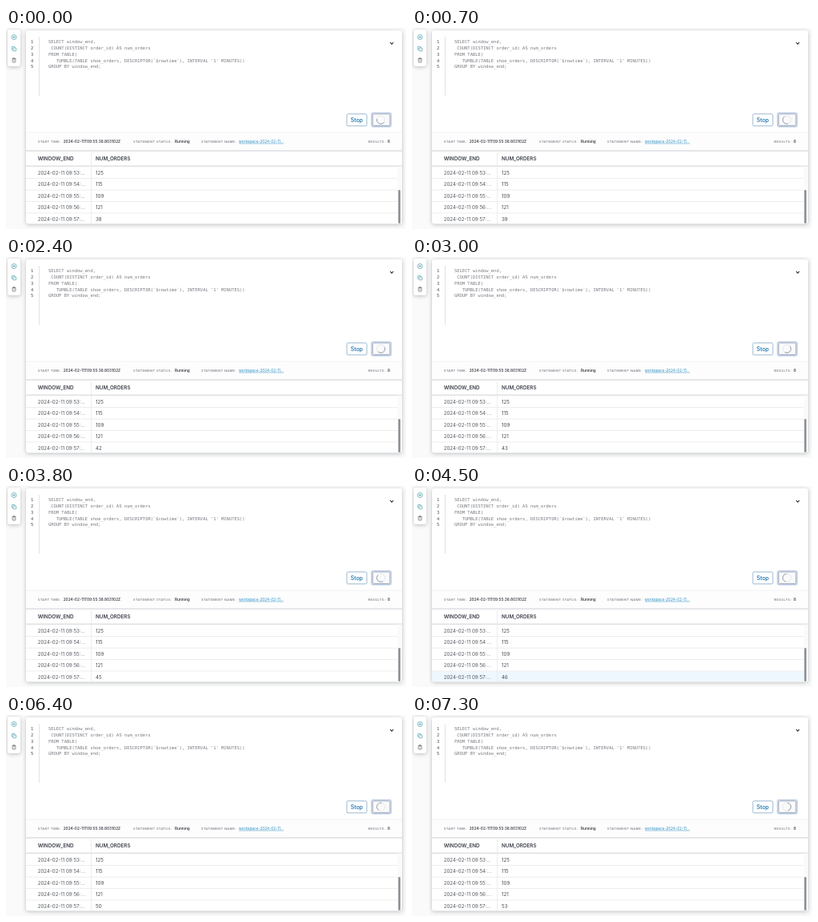
An HTML page with a canvas that plays this animation: 500x252 px, repeating every 7400 ms.

```html
<!DOCTYPE html>
<html lang="en">
<head>
<meta charset="utf-8">
<title>Streaming query results</title>
<style>
  html, body { margin: 0; width: 100%; height: 100%; overflow: hidden; background: #fafafa; }
  canvas { display: block; width: 500px; height: 252px; }
</style>
</head>
<body>
<canvas id="stage"></canvas>
<script>
const W = 500, H = 252, LOOP = 7400, STEP = 100;
const SANS = 'Inter, "Liberation Sans", sans-serif';
const MONO = '"DejaVu Sans Mono", "Liberation Mono", monospace';
const INK = '#3c4048', BLUE = '#2b7db5', TEAL = '#4a9dab', LINE = '#e4e5e8';

// Each update raises the count by one and briefly lights the last row.
const FIRST_COUNT = 38, FLASH = 100;
const UPDATES = [500, 1000, 1600, 2100, 2700, 3100, 3500, 4500,
                 5200, 5600, 5900, 6200, 6600, 6900, 7200];
const SPIN_MS = 625, SPIN_START = 113;

const QUERY = [
  'SELECT window_end,',
  ' COUNT(DISTINCT order_id) AS num_orders',
  'FROM TABLE(',
  "   TUMBLE(TABLE shoe_orders, DESCRIPTOR(`$rowtime`), INTERVAL '1' MINUTES))",
  'GROUP BY window_end;'
];
const COUNTS = [125, 115, 109, 121];

const canvas = document.getElementById('stage');
const ctx = canvas.getContext('2d');
const dpr = window.devicePixelRatio || 1;
canvas.width = W * dpr;
canvas.height = H * dpr;

function text(str, x, y, size, color, { weight = 400, family = SANS, spacing = 0 } = {}) {
  ctx.font = `${weight} ${size}px ${family}`;
  ctx.letterSpacing = spacing + 'px';
  ctx.fillStyle = color;
  ctx.fillText(str, x, y);
  return ctx.measureText(str).width;
}

function rect(x, y, w, h, color) {
  ctx.fillStyle = color;
  ctx.fillRect(x, y, w, h);
}

function box(x, y, w, h, r, fill, stroke, width = 1) {
  ctx.beginPath();
  ctx.roundRect(x, y, w, h, r);
  if (fill) { ctx.fillStyle = fill; ctx.fill(); }
  if (stroke) { ctx.strokeStyle = stroke; ctx.lineWidth = width; ctx.stroke(); }
}

function card(x, y, w, h, r) {
  ctx.save();
  ctx.shadowColor = 'rgba(40, 45, 55, 0.3)';
  ctx.shadowBlur = 5 * dpr;
  ctx.shadowOffsetY = dpr;
  box(x, y, w, h, r, '#fff');
  ctx.restore();
}

function path(points, color, width) {
  ctx.beginPath();
  points.forEach(([x, y], i) => i ? ctx.lineTo(x, y) : ctx.moveTo(x, y));
  ctx.strokeStyle = color;
  ctx.lineWidth = width;
  ctx.stroke();
}

function arc(x, y, r, from, to, color, width) {
  ctx.beginPath();
  ctx.arc(x, y, r, from, to);
  ctx.strokeStyle = color;
  ctx.lineWidth = width;
  ctx.stroke();
}

function drawToolbar() {
  const gray = '#74777d';
  card(2, 2, 16, 46, 3);
  arc(10, 11.5, 3, 0, 2 * Math.PI, TEAL, 0.7);
  path([[8.4, 11.5], [11.6, 11.5]], TEAL, 0.7);
  path([[10, 9.9], [10, 13.1]], TEAL, 0.7);

  box(7.2, 23.4, 3.8, 3.8, 0.6, null, TEAL, 0.7);
  box(8.8, 25, 3.8, 3.8, 0.6, '#fff', TEAL, 0.7);

  path([[7.5, 38.4], [12.5, 38.4]], gray, 0.8);
  path([[9, 37.6], [11, 37.6]], gray, 0.8);
  box(8.1, 38.8, 3.8, 4.2, 0.5, null, gray, 0.8);
  path([[10, 39.8], [10, 42.2]], gray, 0.5);
}

function drawEditor() {
  rect(41, 11, 0.7, 74, '#d6d7da');
  QUERY.forEach((line, i) => {
    const y = 19 + i * 7.85;
    text(String(i + 1), 31, y, 5.4, '#4b4e55', { family: MONO });
    text(line, 53, y, 5.45, '#777a80', { family: MONO });
  });
  path([[480.2, 18], [482.2, 20.2], [484.2, 18]], '#222', 1.1);
}

function drawButtons(t) {
  box(426, 107.8, 25, 15, 1.5, '#fff', '#8fb0cc', 0.9);
  text('Stop', 430.8, 117.9, 6.9, BLUE, { weight: 600 });

  box(456.9, 106.4, 24.4, 17.4, 2, '#fff', '#bccbe2', 1.4);
  box(458.3, 107.8, 21.6, 14.6, 1, '#fafafb', '#8492ab', 0.8);
  const mid = (SPIN_START + t / SPIN_MS * 360) * Math.PI / 180;
  arc(468.6, 115.1, 5.1, 0, 2 * Math.PI, '#e7e9ec', 1);
  arc(468.6, 115.1, 5.1, mid - 1.4, mid + 1.4, '#98a0ab', 1);
}

function drawStatus() {
  rect(25, 131, 470, 23, '#fdfdfd');
  rect(25, 130.7, 470, 0.6, '#ececee');
  rect(25, 153.5, 470, 1, '#cdcfd3');
  const y = 143.9;
  const label = (str, x) => text(str, x, y, 4.1, '#777b84', { weight: 500, spacing: 0.32 });
  const value = (str, x) => text(str, x, y, 4.7, INK, { weight: 600 });
  label('START TIME:', 39.7);
  value('2024-02-11T09:55:38.803102Z', 71.7);
  label('STATEMENT STATUS:', 159);
  value('Running', 211);
  label('STATEMENT NAME:', 244);
  const w = text('workspace-2024-02-11...', 291, y, 4.7, '#278bc0');
  rect(291, y + 0.8, w, 0.5, '#278bc0');
  label('RESULTS:', 452.5);
  value('8', 477);
}

function drawTable(t) {
  const passed = UPDATES.filter(u => u <= t);
  const last = passed.length ? passed[passed.length - 1] : -Infinity;
  const rows = [...COUNTS, FIRST_COUNT + passed.length];

  if (t - last < FLASH) rect(25, 232.3, 464.5, 12.9, '#eef7fd');

  text('WINDOW_END', 39.7, 166.3, 6.3, INK, { weight: 600 });
  text('NUM_ORDERS', 112, 166.3, 6.3, INK, { weight: 600 });
  rect(25, 172.6, 470, 1, '#cfd1d5');

  rows.forEach((count, i) => {
    const y = 183.9 + i * 14.45;
    text(`2024-02-11 09:${53 + i}:...`, 39.7, y, 6.15, '#555960');
    text(String(count), 112, y, 6.2, '#454951');
    if (i < 4) rect(25, 188.3 + i * 14.45, 464.5, 0.7, LINE);
  });
  rect(106, 156, 0.7, 89.3, LINE);

  rect(489.5, 173.6, 5, 71.6, '#fafafa');
  box(490.3, 203, 2.7, 42, 1.3, '#8f9399');
}

function draw(now) {
  const t = Math.floor((now % LOOP) / STEP) * STEP;
  ctx.setTransform(dpr, 0, 0, dpr, 0, 0);
  rect(0, 0, W, H, '#fafafa');
  drawToolbar();
  card(25, 3, 470, 242.6, 3);
  drawEditor();
  drawButtons(t);
  drawStatus();
  drawTable(t);
}

const start = performance.now();
function frame() {
  draw(performance.now() - start);
  requestAnimationFrame(frame);
}
draw(0);
requestAnimationFrame(frame);
</script>
</body>
</html>
```
